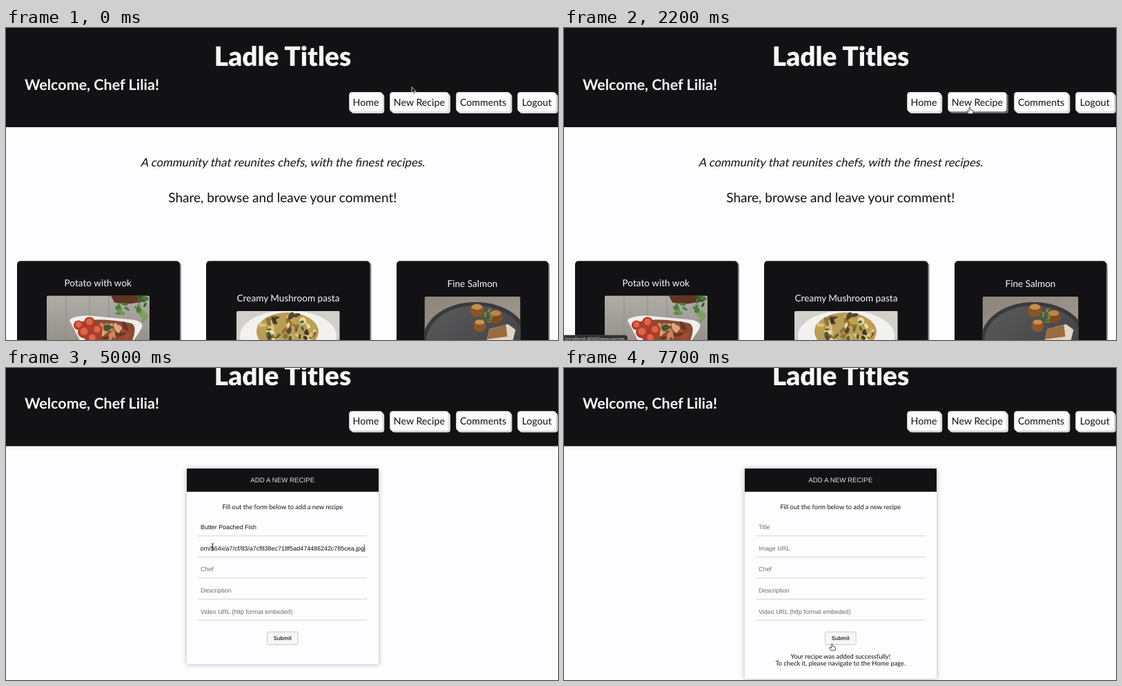
Write an HTML page that moves like this. It is 800 by 453 pixels and loops after 8 s.

```html
<!DOCTYPE html>
<html lang="en">
<head>
<meta charset="utf-8">
<title>Ladle Titles</title>
<style>
  html, body { margin: 0; width: 100%; height: 100%; overflow: hidden; background: #fdfcfe; }
  #stage { display: block; width: 100vw; height: 100vh; }
  text { font-family: Lato, "Open Sans", sans-serif; text-rendering: geometricPrecision; white-space: pre; fill: #111; }
  .mid { text-anchor: middle; }
  .ink { fill: #121113; }
  .light { fill: #f8f7f9; }
  .title { font-size: 38.8px; font-weight: 900; }
  .hello { font-size: 21.5px; font-weight: 700; }
  .nav text { font-size: 14.2px; }
  .dish { font-size: 13.6px; }
  .small { font-size: 9.3px; }
  .arial, .field text { font-family: "Liberation Sans", Arial, sans-serif; }
  .field text { font-size: 8.93px; }
  .field line { stroke: #d3d2d5; stroke-width: 1; }
  .caret { fill: #111; }
  .tile { filter: drop-shadow(2px 2px .6px rgba(0, 0, 0, .45)); }
  .card { fill: #fdfcfe; filter: drop-shadow(0 0 3.5px rgba(0, 0, 0, .3)); }
  #cursor path { stroke-linejoin: round; }
</style>
</head>
<body>
<svg id="stage" viewBox="0 0 800 453" preserveAspectRatio="none">
  <defs>
    <linearGradient id="wood" x2="0" y2="1"><stop stop-color="#b0aca7"/><stop offset="1" stop-color="#96918b"/></linearGradient>
    <linearGradient id="stone" x2="1" y2="1"><stop stop-color="#8c857a"/><stop offset="1" stop-color="#a39c90"/></linearGradient>
    <linearGradient id="plate" x2="1" y2="1"><stop stop-color="#5b5b5c"/><stop offset="1" stop-color="#3b3b3e"/></linearGradient>
    <clipPath id="inputs"><rect x="281.5" y="215" width="239" height="150"/></clipPath>
  </defs>

  <g id="home">
    <text class="mid" transform="translate(400.8 200.5) skewX(-12)" font-size="16.75">A community that reunites chefs, with the finest recipes.</text>
    <text class="mid" x="400.8" y="253" font-size="19.05">Share, browse and leave your comment!</text>
    <g id="cards"></g>
    <text class="mid light dish" x="133.3" y="374.5">Potato with wok</text>
    <text class="mid light dish" x="409" y="397">Creamy Mushroom pasta</text>
    <text class="mid light dish" x="676" y="376">Fine Salmon</text>

    <svg x="59" y="388.5" width="149" height="65">
      <rect width="149" height="65" rx="2" fill="url(#wood)"/>
      <path d="M28 0V65M62 0V65M90 0V65" stroke="#8b8680" stroke-width=".8"/>
      <path d="M93 0H136L132 10Q115 14 98 10Z" fill="#5f3422"/>
      <g id="ivy"></g>
      <path d="M33 36Q36 30 60 29L124 35Q144 38 136 50L126 65H48Z" fill="#f1efec"/>
      <path d="M44 40Q70 30 122 40Q132 44 124 65H56Z" fill="#8a4a33"/>
      <g id="wok"></g>
      <g id="tomato"></g>
      <path d="M82 46Q88 38 96 46Q90 52 84 51Z" fill="#3f5a2c"/>
    </svg>

    <svg x="334" y="411" width="149.5" height="43">
      <rect width="150" height="43" rx="2" fill="#d3d0cb"/>
      <ellipse cx="75" cy="36" rx="70" ry="37" fill="#f3f1ee"/>
      <ellipse cx="74" cy="30" rx="45" ry="28" fill="#b99c55"/>
      <g id="pasta"></g>
    </svg>

    <svg x="606.5" y="390" width="139" height="64">
      <rect width="139" height="64" rx="2" fill="url(#stone)"/>
      <ellipse cx="74" cy="62" rx="76" ry="54" fill="#3a3a3d"/>
      <ellipse cx="74" cy="64" rx="71" ry="51" fill="url(#plate)"/>
      <circle cx="76" cy="20" r="10" fill="#8a5427"/><ellipse cx="76" cy="15" rx="8" ry="4" fill="#c48d4d"/>
      <circle cx="103" cy="29" r="10" fill="#82491f"/><ellipse cx="103" cy="24" rx="8" ry="4" fill="#bf8443"/>
      <circle cx="80" cy="42" r="9" fill="#8f5726"/><ellipse cx="80" cy="37" rx="7" ry="3.5" fill="#c8924f"/>
      <path d="M94 47L121 40L132 48L128 64H90Z" fill="#e0d6c6"/>
      <path d="M94 47L118 41L120 58L90 62Z" fill="#9a6c40"/>
      <g id="herbs"></g>
    </svg>

    <g id="status">
      <path d="M0 446H88Q92 446 92 450V453H0Z" fill="#2f2e31" stroke="#56555a" stroke-width=".6"/>
      <text class="arial" x="2" y="453.8" font-size="7.4" style="fill:#d2d1d4">localhost:4000/new-recipe</text>
    </g>
  </g>

  <g id="form">
    <rect id="sheet" class="card" x="262" y="146" width="278" height="284"/>
    <rect class="ink" x="262" y="146" width="278" height="33.7"/>
    <text class="mid arial" x="400.8" y="166" font-size="9.72" style="fill:#e2e1e4">ADD A NEW RECIPE</text>
    <text class="mid small" x="400.8" y="205">Fill out the form below to add a new recipe</text>
    <g id="fields"></g>
    <rect x="378.5" y="383.2" width="44.6" height="18.4" rx="2" fill="#f6f5f8" stroke="#c8c7cc"/>
    <text class="mid" x="400.8" y="395.3" font-size="7.8" font-weight="500" style="font-family:Inter,sans-serif">Submit</text>
    <g id="done">
      <text class="mid small" x="400.8" y="421.5">Your recipe was added successfully!</text>
      <text class="mid small" x="400.8" y="432.3">To check it, please navigate to the Home page.</text>
    </g>
  </g>

  <g id="head">
    <rect class="ink" width="800" height="144"/>
    <text class="mid light title" x="401" y="55">Ladle Titles</text>
    <text class="light hello" x="27" y="89.5">Welcome, Chef Lilia!</text>
    <g id="nav" class="nav"></g>
  </g>

  <g id="cursor">
    <path data-kind="arrow" d="M0 0V9L2.1 7.1L3.5 10.2L5 9.5L3.6 6.5H6.4Z" fill="#111" stroke="#f4f4f4" stroke-width=".8"/>
    <path data-kind="hand" d="M-1 1a1 1 0 0 1 2 0V4l3.1.6q1.2.4 1 1.6l-.7 3.2H-1.6L-4 6q-.2-1.5 1.2-.9L-1 6.2Z" fill="#fff" stroke="#222" stroke-width=".8"/>
    <path data-kind="beam" d="M-2-5Q0-5 0-4Q0-5 2-5M0-4V4M-2 5Q0 5 0 4Q0 5 2 5M-1.2 1H1.2" fill="none" stroke="#222" stroke-width=".9"/>
  </g>
</svg>

<script>
const LOOP = 8000, STEP = 100, SCROLL = 30.5;
const OPEN = 2600, SENT = 7600;
const $ = id => document.getElementById(id);

function add(parent, tag, attrs, text) {
  const el = document.createElementNS('http://www.w3.org/2000/svg', tag);
  for (const k in attrs) el.setAttribute(k, attrs[k]);
  if (text) el.textContent = text;
  return parent.appendChild(el);
}

// Scatter small ellipses inside an oval with a seeded generator.
function scatter(id, count, cx, cy, rx, ry, size, colors) {
  let seed = count * 7919 + cx;
  const rnd = () => (seed = (seed * 16807) % 2147483647) / 2147483647;
  for (let i = 0; i < 5; i++) rnd();
  for (let i = 0; i < count; i++) {
    const a = rnd() * Math.PI * 2, d = Math.sqrt(rnd());
    const x = cx + Math.cos(a) * d * rx, y = cy + Math.sin(a) * d * ry;
    add($(id), 'ellipse', {
      rx: size * (.7 + rnd() * .6), ry: size * (.3 + rnd() * .4),
      fill: colors[i % colors.length],
      transform: `translate(${x} ${y}) rotate(${rnd() * 180})`
    });
  }
}
scatter('ivy', 9, 112, 20, 10, 9, 4.5, ['#4d7a3a', '#6b9650']);
scatter('ivy', 16, 139, 18, 9, 19, 5, ['#4d7a3a', '#7ba05f', '#355c2b']);
scatter('wok', 22, 98, 52, 26, 12, 6, ['#a8492f', '#c98a5d', '#6b3524', '#d9a87c']);
for (const [x, y, r] of [[46, 43, 7], [62, 39, 8], [54, 53, 9], [73, 50, 8], [66, 62, 8]]) {
  add($('tomato'), 'circle', { cx: x, cy: y, r, fill: '#b83a26' });
  add($('tomato'), 'circle', { cx: x, cy: y - 1, r: r * .6, fill: '#d9674b' });
}
scatter('pasta', 60, 74, 28, 42, 25, 5.5, ['#d8c27c', '#bfa04e', '#e8daa6', '#8f7338', '#55462f']);
scatter('pasta', 16, 74, 28, 36, 22, 3.5, ['#52693a', '#43362a']);
scatter('herbs', 9, 92, 28, 9, 8, 3.5, ['#6d8a3f', '#48682e']);

for (const [x, width] of [[16, 236], [290, 237.5], [566, 220]])
  add($('cards'), 'rect', { x, y: 338.3, width, height: 130, rx: 5, class: 'ink tile' });

// Nav buttons have a stacked drop shadow.
const shadows = [['Home', 497.5, 48], ['New Recipe', 556.5, 84.8], ['Comments', 652.5, 78.2], ['Logout', 741.5, 55.5]]
  .map(([label, x, w]) => {
    const g = add($('nav'), 'g', {});
    for (let d = 2.7; d > 0; d -= .9)
      add(g, 'rect', { x: x + d, y: 93.2 + d, width: w, height: 28, rx: 4 });
    add($('nav'), 'rect', { x, y: 93.2, width: w, height: 28, rx: 4, fill: '#fcfbfd' });
    add($('nav'), 'text', { x: x + w / 2, y: 112.8, class: 'mid' }, label);
    return g;
  });

// label, value, focus time, fill time, blur time
const fields = [
  ['Title', 'Butter Poached Fish', 4400, 4600, 4800],
  ['Image URL', 'https://i.pinimg.com/564x/a7/cf/83/a7cf838ec718f5ad474486242c785cea.jpg', 4800, 5000, 5300],
  ['Chef', 'Chef Toru', 5300, 5600, 5700],
  ['Description', 'A delicious recipe to be easily made at home without any special equipment.', 5700, 5900, 6100],
  ['Video URL (http format embeded)', 'https://www.youtube.com/embed/Qm4xT7bLk2s', 6100, 6200, SENT]
].map(([label, value, focus, fill, blur], i) => {
  const g = add($('fields'), 'g', { class: 'field' }), y = 234.2 + i * 30.6;
  add(g, 'line', { x1: 278, x2: 523, y1: y + 9.6, y2: y + 9.6 });
  const box = add(g, 'g', { 'clip-path': 'url(#inputs)' });
  const text = add(box, 'text', { y });
  const caret = add(box, 'rect', { class: 'caret', y: y - 8.5, width: .9, height: 10.5 });
  return { label, value, focus, fill, blur, text, caret };
});

function drawField(f, t) {
  const filled = t >= f.fill && t < SENT;
  const focused = t >= f.focus && t < f.blur;
  f.text.textContent = filled ? f.value : f.label;
  f.text.style.fill = filled ? '#111' : '#6c6b70';
  const width = filled ? f.text.getComputedTextLength() : 0;
  const x = focused ? Math.min(282, 519 - width) : 282;
  f.text.setAttribute('x', x);
  f.caret.setAttribute('x', x + width + .3);
  const since = t - (filled ? f.fill : f.focus);
  show(f.caret, focused && since % 1000 < 500);
}

// time, x, y of the pointer tip
const path = [
  [0, 588, 85.5], [900, 588, 84], [1200, 588.5, 116], [2200, 588, 115], [OPEN, 588, 115],
  [2900, 600, 236], [3500, 600, 236], [3900, 593.5, 238], [4100, 588, 240], [4200, 588, 240],
  [4400, 303, 231], [4600, 303, 231], [4800, 299.5, 260], [5100, 299.5, 260], [5300, 301, 292],
  [5500, 301, 292], [5700, 307, 323], [6000, 307, 323.5], [6100, 308, 353], [6300, 309, 353],
  [6500, 394, 353], [6600, 394, 353], [7200, 388.5, 400.5], [LOOP, 388.5, 400.5]
];
const ease = p => p * p * (3 - 2 * p);
const ramp = (t, a, b) => ease(Math.min(1, Math.max(0, (t - a) / (b - a))));
const show = (el, on) => el.setAttribute('visibility', on ? 'inherit' : 'hidden');

function pointer(t) {
  const i = path.findIndex(k => k[0] > t);
  const [t0, x0, y0] = path[i - 1], [t1, x1, y1] = path[i];
  const p = ramp(t, t0, t1);
  return [x0 + (x1 - x0) * p, y0 + (y1 - y0) * p];
}

const inside = (x, y, l, top, r, b) => x > l && x < r && y > top && y < b;

function draw(t) {
  const onForm = t >= OPEN, sent = t >= SENT;
  const s = SCROLL * ramp(t, OPEN, 2900);
  const [x, y] = pointer(t);

  show($('home'), !onForm);
  show($('form'), onForm);
  $('head').setAttribute('transform', `translate(0 ${-s})`);
  $('form').setAttribute('transform', `translate(0 ${SCROLL - s})`);
  $('status').setAttribute('opacity', ramp(t, 1400, 1600));
  $('sheet').setAttribute('height', sent ? 305 : 284);
  show($('done'), onForm && sent);
  fields.forEach(f => drawField(f, t));

  const overNav = inside(x, y, 556, 93 - s, 644, 124 - s);
  shadows.forEach((g, i) => g.setAttribute('fill', overNav && i === 1 ? '#6b6a70' : '#dddbe2'));

  let kind = 'arrow';
  if (overNav || onForm && inside(x, y, 378, 383, 423, 402)) kind = 'hand';
  else if (onForm && inside(x, y, 278, 220, 523, 367)) kind = 'beam';
  $('cursor').setAttribute('transform', `translate(${x} ${y})`);
  for (const el of $('cursor').children) show(el, el.dataset.kind === kind);
}

const start = performance.now();
function tick() {
  const t = (performance.now() - start) % LOOP;
  draw(Math.floor(t / STEP) * STEP);
  requestAnimationFrame(tick);
}
tick();
</script>
</body>
</html>
```
